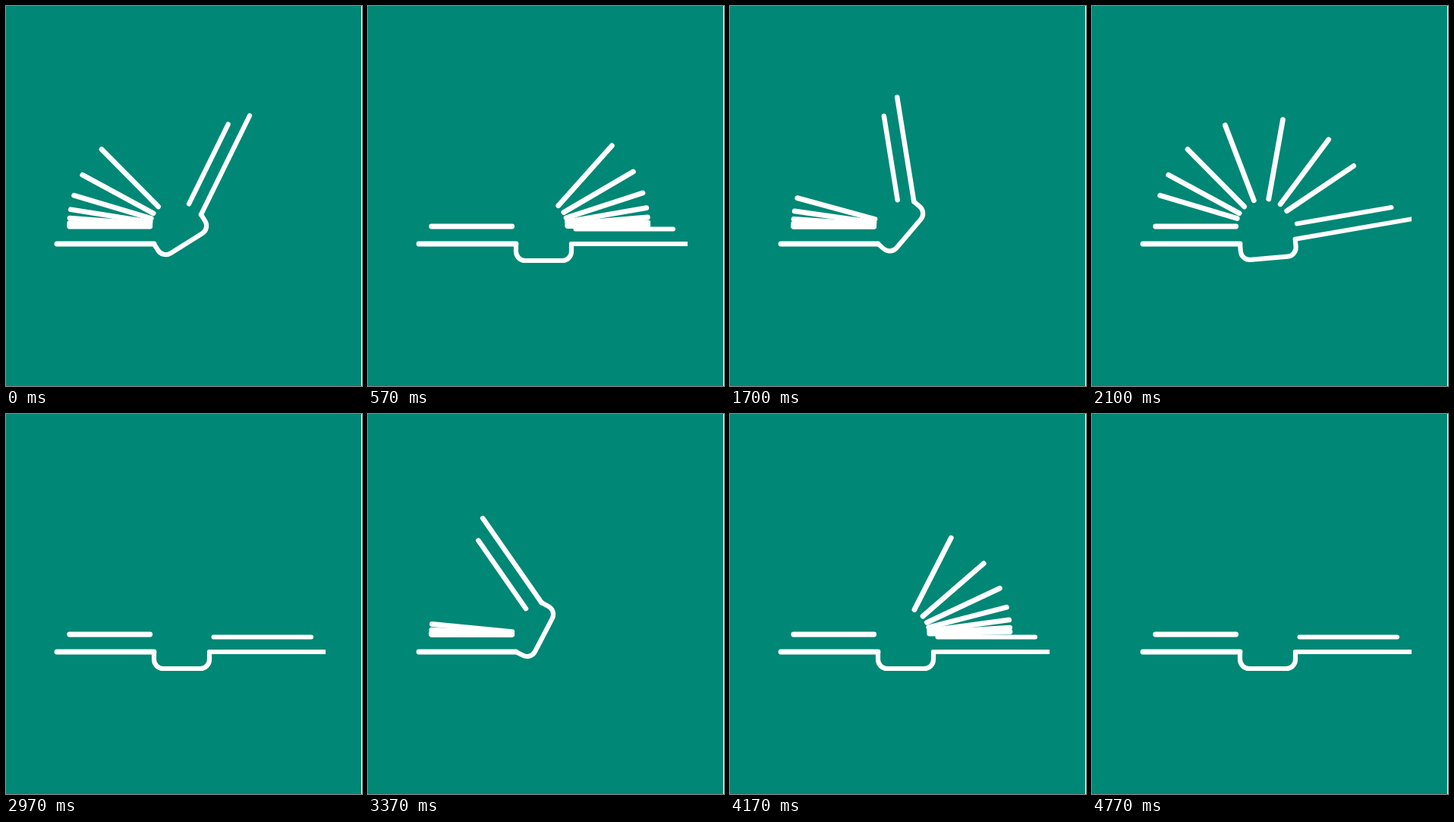
Write an HTML page with a canvas that moves like this. It is 469 px wide and 500 px high and loops after 4970 ms.

```html
<!DOCTYPE html>
<html lang="en">
<head>
<meta charset="utf-8">
<title>Book loader</title>
<style>
  html, body { margin: 0; width: 100%; height: 100%; overflow: hidden; background: #008775; }
  canvas { display: block; }
</style>
</head>
<body>
<canvas id="stage" width="469" height="500"></canvas>
<script>
const ctx = document.getElementById('stage').getContext('2d');
const LOOP = 4970;
const STARTS = [-540, 1300, 3101];   // moments at which the book starts to open
const FAN = { x: 226.3, y: 290, inner: 36.6, outer: 142.6 };
const FLIP = { pages: 7, start: -45.5, stagger: 65, duration: 1390 };
const SPINE = { x: 195, y: 313, width: 73, depth: 22, radius: 12 };
const COVER_KEYS = [[0, 179.3], [100, 172], [540, 63.8], [699, 25.2], [800, 9.8], [960, 0]];
const rad = deg => deg * Math.PI / 180;
const easeInOutQuart = t => t < 0.5 ? 8 * t ** 4 : 1 - 8 * (1 - t) ** 4;

// The picture advances ten times a second, with alternating 70 and 130 ms holds.
function stepTime(t) {
  const s = t + 30;
  return 100 * (2 * Math.floor(s / 200) + (s % 200 >= 130 ? 1 : 0));
}

// Smooth curve through [time, value] keys, flat at both ends.
function curve(keys, t) {
  const last = keys.length - 1;
  if (t <= keys[0][0]) return keys[0][1];
  if (t >= keys[last][0]) return keys[last][1];
  const slope = i => i === 0 || i === last ? 0 :
    (keys[i + 1][1] - keys[i - 1][1]) / (keys[i + 1][0] - keys[i - 1][0]);
  let i = 0;
  while (t > keys[i + 1][0]) i++;
  const [t0, a] = keys[i], [t1, b] = keys[i + 1];
  const span = t1 - t0, u = (t - t0) / span, v = 1 - u;
  return a * (1 + 2 * u) * v * v + b * u * u * (3 - 2 * u)
    + span * u * v * (slope(i) * v - slope(i + 1) * u);
}

function line(x1, y1, x2, y2, width) {
  ctx.lineWidth = width;
  ctx.beginPath();
  ctx.moveTo(x1, y1);
  ctx.lineTo(x2, y2);
  ctx.stroke();
}

// Angle 0 lies on the left, 180 on the right.
function drawPage(deg) {
  const c = -Math.cos(rad(deg)), s = -Math.sin(rad(deg));
  line(FAN.x + FAN.inner * c, FAN.y + FAN.inner * s,
       FAN.x + FAN.outer * c, FAN.y + FAN.outer * s, 6.8);
}

// A page vanishes once it has settled on the right.
function drawPages(phase) {
  drawPage(0);
  for (let i = 0; i < FLIP.pages; i++) {
    const t = (phase - FLIP.start - FLIP.stagger * i) / FLIP.duration;
    if (t > 0 && t < 0.92) drawPage(180 * easeInOutQuart(t));
  }
}

function drawSpine(deg) {
  const { width, depth, radius } = SPINE;
  ctx.save();
  ctx.translate(SPINE.x, SPINE.y);
  line(-128, 0, 0, 0, 6.8);
  ctx.rotate(-rad(deg));
  ctx.lineWidth = 6.2;
  ctx.beginPath();
  ctx.moveTo(0, 0);
  ctx.arcTo(0, depth, width / 2, depth, radius);
  ctx.arcTo(width, depth, width, 0, radius);
  ctx.lineTo(width, 0);
  ctx.stroke();
  ctx.restore();
}

function drawCover(deg) {
  const length = 157 - 0.2 * deg + 0.00022 * deg * deg;
  const pageEnd = 134 - 0.21 * deg + 0.00045 * deg * deg;
  const lift = 19.4 + 3 * deg / 180;
  const width = 6 + 0.8 * deg / 180;
  const half = rad(deg / 2);
  ctx.save();
  ctx.translate(SPINE.x + SPINE.width * Math.cos(half), SPINE.y - SPINE.width * Math.sin(half));
  ctx.rotate(-rad(deg));
  line(0, 0, length, 0, width);
  line(5.5, -lift, pageEnd, -lift, width);
  ctx.restore();
}

function draw(t) {
  const now = stepTime(t);
  const start = STARTS.filter(s => s <= now).pop();
  const phase = now - start;
  const angle = curve(COVER_KEYS, phase);
  ctx.fillStyle = '#008775';
  ctx.fillRect(0, 0, 469, 500);
  ctx.fillStyle = '#fff';
  ctx.fillRect(468, 0, 1, 500);   // thin edge of the stage
  ctx.save();
  ctx.beginPath();
  ctx.rect(0, 0, 421, 500);
  ctx.clip();
  ctx.strokeStyle = '#fff';
  ctx.lineCap = ctx.lineJoin = 'round';
  drawSpine(angle / 2);
  drawCover(angle);
  drawPages(phase);
  ctx.restore();
}

const begin = performance.now();
function tick() {
  draw((performance.now() - begin) % LOOP);
  requestAnimationFrame(tick);
}
tick();
</script>
</body>
</html>
```
